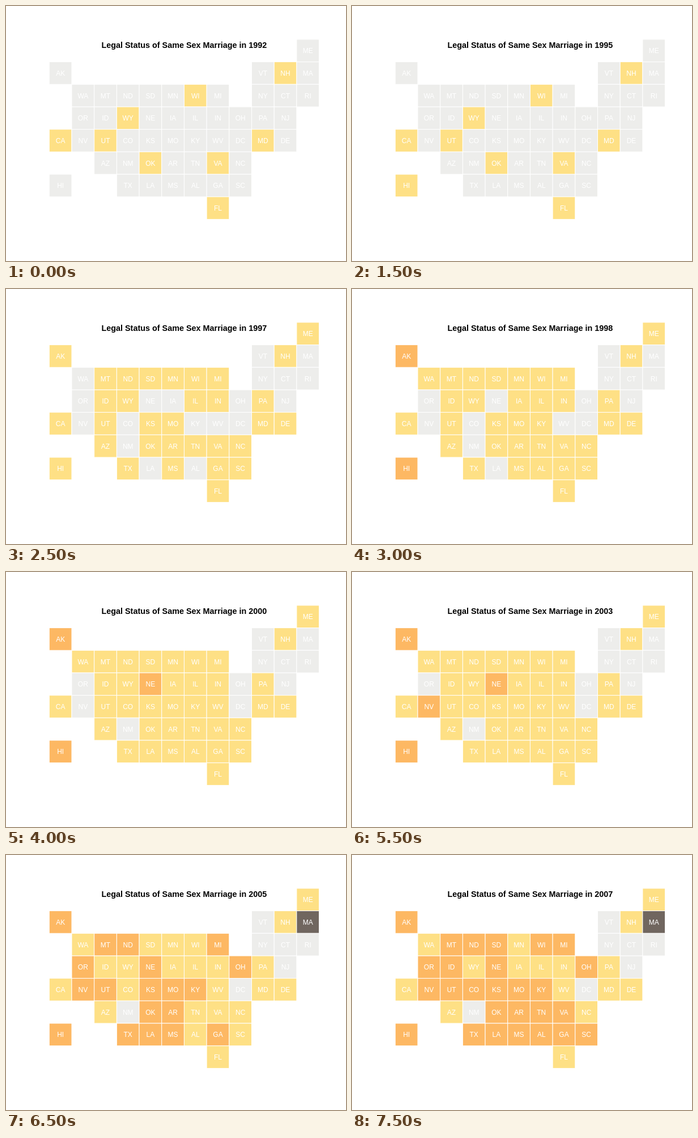
Animation of 600x450 px, one loop 8000 ms. Source, as an HTML page:

```html
<!DOCTYPE html>
<html lang="en">
<head>
<meta charset="utf-8">
<title>Legal status by year</title>
<style>
  html, body { margin: 0; width: 100%; height: 100%; overflow: hidden; background: #fff; }
  svg { display: block; }
  text { font-family: "Liberation Sans", Arial, sans-serif; text-anchor: middle; }
  .title { font-size: 14.4px; font-weight: bold; fill: #000; }
  .label { font-size: 12px; fill: #fff; }
  rect { stroke: #fff; stroke-width: 1; }
  .none { fill: #ededeb; }
  .statute { fill: #fee085; }
  .amendment { fill: #fdb863; }
  .legal { fill: #70665f; }
</style>
</head>
<body>
<svg id="map" width="600" height="450" viewBox="0 0 600 450">
  <text class="title" id="title" x="314.4" y="74"></text>
</svg>
<script>
const FIRST_YEAR = 1992, YEARS = 16, STEP = 500;
const LEFT = 76.3, TOP = 58.9, SIZE = 39.69;

// One line per row of the grid; dots are empty cells.
const GRID = [
  '.. .. .. .. .. .. .. .. .. .. .. ME',
  'AK .. .. .. .. .. .. .. .. VT NH MA',
  '.. WA MT ND SD MN WI MI .. NY CT RI',
  '.. OR ID WY NE IA IL IN OH PA NJ ..',
  'CA NV UT CO KS MO KY WV DC MD DE ..',
  '.. .. AZ NM OK AR TN VA NC .. .. ..',
  'HI .. .. TX LA MS AL GA SC .. .. ..',
  '.. .. .. .. .. .. .. FL .. .. .. ..'
];

// Changes of status in the order they take effect.
const CHANGES = [
  [1992, 'statute', 'CA UT WY OK WI VA FL MD NH'],
  [1994, 'statute', 'HI'],
  [1996, 'statute', 'AK SD MI ID IL PA KS MO DE AZ TN NC GA SC'],
  [1997, 'statute', 'ME MT ND MN IN AR MS TX'],
  [1998, 'statute', 'WA IA KY AL'],
  [1998, 'amendment', 'AK HI'],
  [1999, 'statute', 'LA'],
  [2000, 'statute', 'CO WV'],
  [2000, 'amendment', 'NE'],
  [2002, 'amendment', 'NV'],
  [2004, 'amendment', 'OR MT ND MI OH UT KY MO OK AR LA MS GA'],
  [2004, 'legal', 'MA'],
  [2005, 'amendment', 'KS TX'],
  [2006, 'amendment', 'SD WI ID CO TN VA AL SC']
];

const map = document.getElementById('map');
const title = document.getElementById('title');
const tiles = {};

function add(tag, attrs) {
  const el = document.createElementNS('http://www.w3.org/2000/svg', tag);
  for (const key in attrs) el.setAttribute(key, attrs[key]);
  return map.appendChild(el);
}

GRID.forEach((line, row) => line.split(' ').forEach((state, col) => {
  if (state === '..') return;
  const x = LEFT + col * SIZE, y = TOP + row * SIZE;
  tiles[state] = add('rect', { x, y, width: SIZE, height: SIZE });
  add('text', { class: 'label', x: x + SIZE / 2, y: y + SIZE / 2 + 4.5 }).textContent = state;
}));

function showYear(year) {
  title.textContent = 'Legal Status of Same Sex Marriage in ' + year;
  const status = {};
  for (const [from, kind, states] of CHANGES) {
    if (from <= year) states.split(' ').forEach(state => status[state] = kind);
  }
  for (const state in tiles) tiles[state].setAttribute('class', status[state] || 'none');
}

let shown;
function frame() {
  const year = FIRST_YEAR + Math.floor(performance.now() / STEP) % YEARS;
  if (year !== shown) showYear(shown = year);
  requestAnimationFrame(frame);
}
frame();
</script>
</body>
</html>
```
